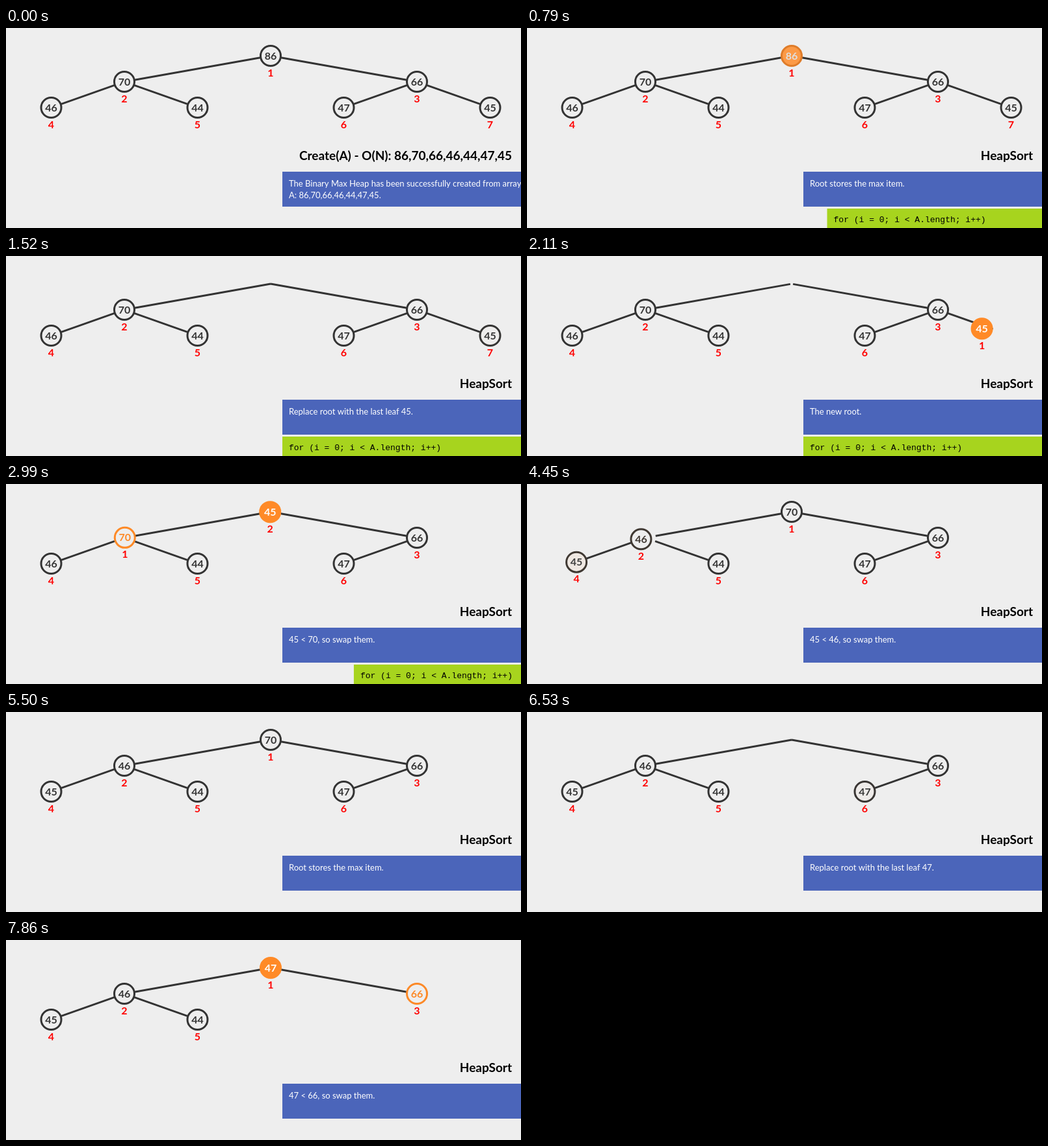
These frames come from a looping animation (792 by 309 pixels, 8 s). An HTML page with a canvas:

```html
<!DOCTYPE html>
<html lang="en">
<head>
<meta charset="utf-8">
<title>HeapSort</title>
<style>
  html, body { margin: 0; width: 100%; height: 100%; overflow: hidden; background: #eee; }
  canvas { display: block; }
</style>
</head>
<body>
<canvas id="stage" width="792" height="309"></canvas>
<script>
const ctx = document.getElementById('stage').getContext('2d');
const LOOP = 8000, TICK = 147.2, FIRST_TICK = 484, LAST_TICK = 50;
const STEP = 498, FIRST_STEP = 449;
const RADIUS = 16, SANS = 'Lato, sans-serif';

const PAPER = [238, 238, 238], INK = [51, 51, 51], ORANGE = [255, 138, 39], WHITE = [255, 255, 255];
const STYLES = {
  plain: [PAPER, INK, INK],
  filled: [ORANGE, ORANGE, WHITE],
  outlined: [PAPER, ORANGE, ORANGE]
};

// Centre of each heap slot, numbered from 1.
const SLOTS = [null, [407, 43], [182, 83], [632, 83], [69.5, 123], [294.5, 123], [519.5, 123], [744.5, 123]];
const VALUES = [86, 70, 66, 46, 44, 47, 45];

const state = (status, heap, filled, outlined) => ({ status, heap, filled, outlined });
const STATES = [
  state('The Binary Max Heap has been successfully created from array\nA: 86,70,66,46,44,47,45.', VALUES),
  state('Root stores the max item.', VALUES, 86),
  state('Take out the root.', [0, 70, 66, 46, 44, 47, 45]),
  state('Replace root with the last leaf 45.', [0, 70, 66, 46, 44, 47, 45], 45),
  state('The new root.', [45, 70, 66, 46, 44, 47], 45),
  state('45 < 70, so swap them.', [45, 70, 66, 46, 44, 47], 45, 70),
  state('45 < 70, so swap them.', [70, 45, 66, 46, 44, 47]),
  state('45 < 46, so swap them.', [70, 45, 66, 46, 44, 47], 45, 46),
  state('45 < 46, so swap them.', [70, 46, 66, 45, 44, 47]),
  state('ExtractMax() has been completed.\nWe return the max item: 86.', [70, 46, 66, 45, 44, 47]),
  state('86 is appended to the partial sorted order.', [70, 46, 66, 45, 44, 47]),
  state('Root stores the max item.', [70, 46, 66, 45, 44, 47], 70),
  state('Take out the root.', [0, 46, 66, 45, 44, 47]),
  state('Replace root with the last leaf 47.', [0, 46, 66, 45, 44, 47], 47),
  state('The new root.', [47, 46, 66, 45, 44], 47),
  state('47 < 66, so swap them.', [47, 46, 66, 45, 44], 47, 66)
];

const clamp = x => Math.max(0, Math.min(1, x));
const mix = (a, b, k) => a + (b - a) * k;
const mixAll = (a, b, k) => a.map((v, i) => mix(v, b[i], k));
const rgb = c => `rgb(${c.map(Math.round)})`;
const cubic = x => x < 0.5 ? 4 * x ** 3 : 1 - 4 * (1 - x) ** 3;
const swing = x => 0.5 - Math.cos(Math.PI * clamp(x)) / 2;
const slotOf = (s, value) => s.heap.indexOf(value) + 1;
const styleOf = (s, value) =>
  STYLES[value === s.filled ? 'filled' : value === s.outlined ? 'outlined' : 'plain'];

function text(str, x, y, font, color, align = 'left') {
  ctx.font = font;
  ctx.fillStyle = color;
  ctx.textAlign = align;
  ctx.fillText(str, x, y);
}

function drawEdge(child, from, to, k) {
  const parent = child >> 1;
  const present = (s, slot) => s.heap[slot - 1] ? 1 : 0;
  const before = present(from, child), after = present(to, child);
  if (!before && !after) return;
  const [px, py] = SLOTS[parent], [cx, cy] = SLOTS[child];
  const length = Math.hypot(cx - px, cy - py);
  const start = RADIUS * mix(present(from, parent), present(to, parent), k) / length;
  const end = (1 - RADIUS / length) * mix(before, after, k);
  if (end <= start) return;
  ctx.beginPath();
  ctx.moveTo(mix(px, cx, start), mix(py, cy, start));
  ctx.lineTo(mix(px, cx, end), mix(py, cy, end));
  ctx.strokeStyle = rgb(INK);
  ctx.lineWidth = 3;
  ctx.stroke();
}

function drawNode(value, from, to, k) {
  const oldSlot = slotOf(from, value), newSlot = slotOf(to, value);
  const scale = newSlot ? 1 : 1 - k;
  if (!oldSlot || scale < 0.02) return;
  const slot = newSlot || oldSlot;
  const [x, y] = mixAll(SLOTS[oldSlot], SLOTS[slot], k);
  const oldStyle = styleOf(from, value);
  const newStyle = newSlot ? styleOf(to, value) : oldStyle;
  const [fill, stroke, ink] = oldStyle.map((c, i) => rgb(mixAll(c, newStyle[i], k)));
  ctx.beginPath();
  ctx.arc(x, y, 15.5 * scale, 0, 2 * Math.PI);
  ctx.fillStyle = fill;
  ctx.fill();
  ctx.strokeStyle = stroke;
  ctx.lineWidth = 3 * scale;
  ctx.stroke();
  const font = `bold ${16 * scale}px ${SANS}`;
  text(value, x, y + 5.5 * scale, font, ink, 'center');
  text(slot, x, y + 26 + 5.5 * scale, font, '#f00', 'center');
}

function drawPanels(time, index) {
  const title = index ? 'HeapSort' : 'Create(A) - O(N): 86,70,66,46,44,47,45';
  text(title, 778, 204, `bold 19px ${SANS}`, '#000', 'right');

  ctx.fillStyle = '#4b65ba';
  ctx.fillRect(425, 222, 367, 54);
  STATES[index].status.split('\n').forEach((line, i) =>
    text(line, 435, 245 + 18 * i, `13px ${SANS}`, '#fff'));

  const shown = swing((time - 484) / 370) - swing((time - 2850) / 370);
  if (shown <= 0) return;
  const left = 792 - 367 * shown;
  ctx.fillStyle = '#a7d41e';
  ctx.fillRect(left, 279, 367, 30);
  text('for (i = 0; i < A.length; i++)', left + 10, 300, '13px "Liberation Mono", monospace', '#000');
}

function draw(now) {
  // The picture advances in held ticks.
  const tick = Math.min(LAST_TICK, Math.floor((now % LOOP - FIRST_TICK) / TICK));
  const time = tick < 0 ? 0 : FIRST_TICK + tick * TICK;
  const progress = Math.max(0, (time - FIRST_STEP) / STEP + 1);
  const index = time ? Math.min(STATES.length - 1, Math.floor(progress)) : 0;
  const from = STATES[Math.max(0, index - 1)], to = STATES[index];
  const k = cubic(clamp(progress - index));

  ctx.fillStyle = rgb(PAPER);
  ctx.fillRect(0, 0, 792, 309);
  for (let child = 2; child <= 7; child++) drawEdge(child, from, to, k);
  VALUES.forEach(value => drawNode(value, from, to, k));
  drawPanels(time, index);
}

const begin = performance.now();
function frame() {
  draw(performance.now() - begin);
  requestAnimationFrame(frame);
}
frame();
</script>
</body>
</html>
```
